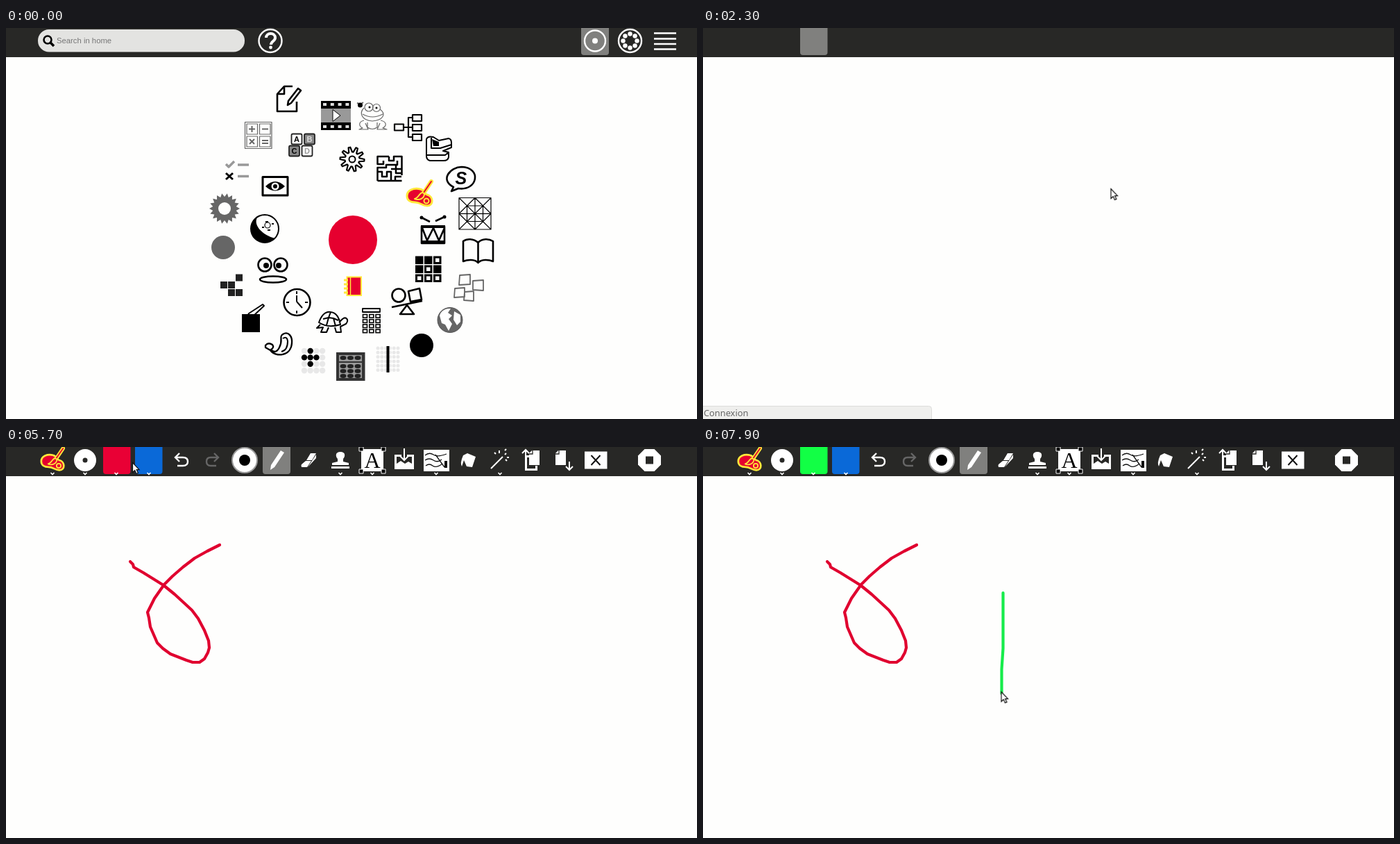
Recreate the animation shown at these times as an HTML page. Size 996 by 563 pixels, loop 8000 ms.

```html
<!DOCTYPE html>
<html lang="en">
<head>
<meta charset="utf-8">
<title>Paint session</title>
<style>
  html, body { margin: 0; width: 100%; height: 100%; overflow: hidden; background: #fefefd; }
  svg { display: block; width: 100%; height: 100%; }
  text { font-family: "Liberation Sans", Arial, sans-serif; stroke: none; }
  .line { fill: none; stroke: #000; stroke-width: 2.6; stroke-linejoin: round; }
  .thin { stroke-width: 1.2; }
  .gray { stroke: #666; }
  .solid { fill: #000; stroke: none; }
  .ink { fill: #fff; stroke: none; }
  .pen { fill: none; stroke: #fff; stroke-width: 2.4; }
  .stroke { fill: none; stroke-width: 4.2; stroke-linecap: round; stroke-linejoin: round; stroke-dasharray: 100 200; }

  .anim, .anim * { animation-duration: 8s; animation-delay: -10ms; animation-iteration-count: infinite; animation-timing-function: step-end; }
  #home { animation-name: home; }
  #hover { animation-name: hover; }
  #paint { animation-name: paint; }
  #tools { animation-name: tools; }
  #carets { animation-name: carets; }
  #blue { animation-name: blue; }
  #color { animation-name: color; }
  #status { animation-name: status; }
  #popup { animation-name: popup; }
  #bigArrow { animation-name: bigArrow; }
  #arrow { animation-name: arrow; }
  #loop { animation-name: loop; }
  #bar { animation-name: bar; }

  @keyframes home { 0% { opacity: 1 } 27.5%, 100% { opacity: 0 } }
  @keyframes hover { 0% { opacity: 0 } 18.75%, 100% { opacity: 1 } }
  @keyframes paint { 0% { opacity: 0 } 27.5%, 100% { opacity: 1 } }
  @keyframes tools { 0% { opacity: 0 } 30%, 100% { opacity: 1 } }
  @keyframes carets { 0% { opacity: 0 } 33.75%, 100% { opacity: 1 } }
  @keyframes blue { 0% { opacity: 0 } 31.25%, 100% { opacity: 1 } }
  @keyframes color {
    0% { fill: #282826 } 28.75% { fill: #80807e }
    31.25% { fill: #e90035 } 86.25%, 100% { fill: #12ff45 }
  }
  @keyframes status { 0% { opacity: 0 } 28.75% { opacity: 1 } 33.75%, 100% { opacity: 0 } }
  @keyframes popup { 0% { opacity: 0 } 76.25% { opacity: 1 } 86.25%, 100% { opacity: 0 } }
  @keyframes bigArrow {
    0% { transform: translate(-50px, -50px) }
    7.5% { transform: translate(164px, 177px) }
    8.75% { transform: translate(211px, 239px) }
    10% { transform: translate(211px, 239px); animation-timing-function: steps(4) }
    15% { transform: translate(410px, 322px); animation-timing-function: steps(3) }
    18.75% { transform: translate(575px, 245px) }
    20%, 100% { transform: translate(588px, 232px) }
  }
  @keyframes arrow {
    0% { transform: translate(587.5px, 231px) }
    33.75% { transform: translate(586px, 231px) }
    38.75% { transform: translate(586px, 231px); animation-timing-function: steps(3) }
    42.5% { transform: translate(298px, 234px) }
    45% { transform: translate(298px, 234px); animation-timing-function: steps(4) }
    50% { transform: translate(307px, 139px) }
    52.5% { transform: translate(283px, 154px) }
    53.75% { transform: translate(243px, 183px) }
    55% { transform: translate(214px, 218px) }
    56.25% { transform: translate(211px, 265px) }
    57.5% { transform: translate(243px, 300px) }
    58.75% { transform: translate(285.5px, 304px) }
    60% { transform: translate(280px, 253px) }
    61.25% { transform: translate(243px, 212px) }
    62.5% { transform: translate(179px, 163px) }
    66.25% { transform: translate(179px, 163px); animation-timing-function: steps(2) }
    68.75% { transform: translate(202px, 80px) }
    70% { transform: translate(192px, 11px) }
    71.25% { transform: translate(182px, 22px) }
    73.75% { transform: translate(172px, 11px) }
    78.75% { transform: translate(172px, 11px); animation-timing-function: steps(5) }
    85% { transform: translate(209px, 71px) }
    88.75% { transform: translate(209px, 71px); animation-timing-function: steps(4) }
    93.75% { transform: translate(432px, 210px); animation-timing-function: steps(4) }
    98.75%, 100% { transform: translate(429.5px, 352px) }
  }
  @keyframes loop {
    0% { stroke-dashoffset: 101 }
    51.25% { stroke-dashoffset: 101; animation-timing-function: steps(6) }
    58.75% { stroke-dashoffset: 35.7; animation-timing-function: steps(3) }
    62.5%, 100% { stroke-dashoffset: 0 }
  }
  @keyframes bar {
    0% { stroke-dashoffset: 101 }
    93.75% { stroke-dashoffset: 101; animation-timing-function: steps(4) }
    98.75%, 100% { stroke-dashoffset: 0 }
  }
</style>
</head>
<body>
<svg class="anim" viewBox="0 0 996 563">
  <defs>
    <g id="palette" stroke-linejoin="round" stroke-linecap="round">
      <path d="M-18 2C-18-7-8-10 1-8C7-7 6-1 11 0C20 2 21 16 11 16C4 16 1 11-6 11C-13 11-18 8-18 2Z" fill="#e6002f" stroke="#ffe83a" stroke-width="3"/>
      <path d="M17-19L5-1" stroke="#ffe83a" stroke-width="6"/>
      <path d="M17-19L6-3" stroke="#e6002f" stroke-width="2"/>
      <path d="M5-3C0-4-1 5-7 6C0 9 7 5 7-1Z" fill="#e6002f" stroke="#ffe83a" stroke-width="2"/>
      <circle cx="10" cy="9" r="3.5" fill="#e6002f" stroke="#ffe83a" stroke-width="2"/>
    </g>
  </defs>
  <rect width="996" height="563" fill="#fefefd"/>
  <rect width="996" height="42" fill="#282826"/>

  <g id="home">
    <rect x="46" y="2" width="298" height="32.5" rx="16" fill="#e3e3e1"/>
    <g class="line"><circle cx="60" cy="17" r="5.5"/><path d="M64 21l5 5" stroke-width="3.5"/></g>
    <text x="73" y="22" font-size="11.3" fill="#777">Search in home</text>
    <g class="pen">
      <circle cx="381" cy="18.5" r="16.5"/>
      <path d="M375 14c0-8 13-8 13 0c0 5-6 5-6 10" stroke-width="4"/>
      <rect x="829" y="-4" width="40" height="43" rx="4" fill="#80807e" stroke="none"/>
      <circle cx="849" cy="18.5" r="15"/>
      <circle cx="899.5" cy="18.5" r="16.5"/>
      <path d="M934 7.5h32m-32 8h32m-32 7.5h32m-32 7.5h32"/>
    </g>
    <g class="ink" id="ringDots"><circle cx="381.5" cy="28" r="2.4"/><circle cx="849" cy="18.5" r="4"/></g>

    <g class="line">
      <path d="M413 84H401L391 95V120H419V106M391 95H401V84"/>
      <path d="M421 87l4 3-14 18-5 3 1-6z"/>
      <g class="gray thin">
        <path d="M344.500 135.500h38.500v38h-38.500zM347 138h15.500v15h-15.500zM365.500 138h15.500v15h-15.500zM347 156h15.500v15h-15.500zM365.500 156h15.500v15h-15.500z"/>
        <path d="M350 145.500h9m-4.500-4.500v9M369 145.500h9M351 160l7 7m0-7l-7 7M369 162h9m-9 4h9" stroke-width="2"/>
      </g>
      <g class="thin gray">
        <circle cx="523" cy="114" r="6"/><circle cx="534" cy="115" r="5.500"/>
        <path d="M516 115C509 122 512 133 528 134C543 133 549 124 539 117M514 124Q528 132 543 124M516 133C508 135 508 141 514 144L509 146H522L518 137M540 133C549 135 549 141 543 144L549 146H535L539 137M521 136V143Q528 148 535 143V136"/>
        <path d="M506 108l3 1m6-2l-3 2" stroke-width="2"/>
        <g class="solid"><circle cx="524" cy="114" r="1.500"/><circle cx="534" cy="115" r="1.500"/><circle cx="510.500" cy="111" r="3.500"/></g>
      </g>
      <path d="M560 138.500h13v9h-13zM586 125h13v9h-13zM586 139h13v9h-13zM586 153h13v9h-13zM573 143h13M586 129h-6v28h6" stroke-width="2.200"/>
      <path d="M606 184V160Q608 155 616 157L624 162L638 159Q642 160 642 165V172L630 177L638 179V186Q637 191 631 191H611Q606 190 606 184ZM606 183H633L638 179M613 158V173H626L642 168" stroke-width="2"/>
      <path d="M614 160l10 4v6h-8z" class="solid"/>
      <path id="gear" stroke-width="2.200"/><circle cx="499" cy="189" r="4.500" stroke-width="2"/>
      <path d="M552 185H535.500V196H544V191M552 185V191H559V185H570.500V212M535.500 220V201H548V197H564V191M535.500 207H542V214H549V207H555V220H535.500M549 220H570.500M555 203H570M562 197V209H570M561 220V214H570" stroke-width="2.500"/>
      <path d="M645 229C625 219 640 200 657 200C686 201 680 235 652 231L642 235Z"/>
      <path d="M653 244.500h46v45.500h-46zM653 244.500l46 45.500m0-45.500l-46 45.500M676 244.500v45.500m-23-22.700h46M676 244.500l23 22.800l-23 22.700l-23-22.700zM664.500 256h23v22.500h-23z" class="thin"/>
      <path d="M599 273l12 6m21-7l-13 6M599 286h33v24h-33zM600 288l7 18l9-18l8 18l8-18"/><path d="M598 308h35M598 286h35" stroke-width="4"/>
      <g class="solid"><circle cx="599" cy="273" r="2.500"/><circle cx="632" cy="272" r="2.500"/></g>
      <path d="M680.500 309C674 303 664 303 659 307V336C666 333 676 333 680.500 338C685 333 695 333 702 336V307C696 303 686 303 680.500 309ZV337"/>
      <path d="M654 356l15-1v14l-16 1zM673 364l15-1v15l-15-1zM647 375l14-1v13l-15 1zM661 380l13-1v14l-14-1z" class="gray" stroke-width="1.800"/>
      <circle cx="640" cy="420.500" r="18" fill="#666" stroke="#555" stroke-width="1"/>
      <path d="M625 414C628 405 635 404 641 404L637 410L643 414L638 419L643 426L638 436L633 427L628 425ZM646 408L655 413L655 423L650 428L645 420Z" class="ink"/>
      <circle cx="566" cy="385" r="9.500"/><path d="M580 379l16-4l3 16l-16 3zM556 402l44-9M578 399l10 13h-20z"/>
      <path d="M514 404h25v5h-25z" stroke-width="1.800"/>
      <path d="M451 424C455 413 461 408 468 409C477 410 481 419 482 427C472 430 460 430 451 424ZM453 427L448 432L457 431L454 438H462L465 431M474 431L476 438H483L482 430L490 426C495 420 490 415 485 419L480 424M457 419L465 417L472 418L479 421M465 417L462 428M472 418L475 429M465 417L468 409" stroke-width="2"/>
      <circle cx="419.500" cy="395" r="19"/><path d="M419 394v-9m0 9l8 9M419 379v4m0 24v4M404 395h4m23 0h4" stroke-width="2"/>
      <path d="M346 418l4-7l20-13l2 2l-17 16z" stroke-width="2"/>
      <path d="M374 457Q378 452 384 456Q387 460 382 463Q389 470 394 460C400 448 393 445 399 441C407 436 413 444 412 454C411 472 389 475 381 464L374 460Z" stroke-width="2.300"/>
      <path d="M399 447Q405 443 406 451Q406 464 397 466" stroke-width="2"/>
      <circle cx="373" cy="341" r="9.500"/><circle cx="396" cy="341" r="9.500"/><ellipse cx="385" cy="362" rx="19" ry="4.500"/>
      <g class="solid"><circle cx="375" cy="342" r="4"/><circle cx="393" cy="342" r="4"/></g>
      <circle cx="373" cy="289" r="20" stroke-width="2"/>
      <path d="M364 270C353 283 371 299 388 303C378 314 353 310 353 289C353 280 358 273 364 270Z" class="solid"/>
      <path d="M374 279h4m-9 8h3m5 4h4m2-9h3" stroke-width="2"/><circle cx="377" cy="284" r="4" class="thin"/>
      <path d="M370 214.500h36v26.500h-36z" stroke-width="3"/><path d="M374 228Q388 214 402 228Q388 241 374 228Z" class="solid"/>
      <circle cx="388" cy="228" r="5.500" class="ink"/><circle cx="388" cy="228" r="3" class="solid"/>
      <path d="M317 196l4 4l8-8M334 197h16m-16 16.500h16" stroke="#999" stroke-width="3.500"/><path d="M317 209l10 9m0-9l-10 9" stroke-width="3"/>
    </g>
    <text x="647.500" y="225" font-size="25" font-weight="700" font-style="italic">S</text>

    <path d="M454 105h43v42h-43z"/><path d="M454 116h43v20h-43z" fill="#999"/>
    <path d="M457 110h38m-38 32h38" stroke="#ddd" stroke-width="4" stroke-dasharray="5 5.800"/>
    <path d="M471 117.500v17l11-8.500z" fill="#fff" stroke="#000"/>
    <g id="blocks" font-weight="700" font-size="11" text-anchor="middle"></g>
    <path id="burst" fill="#666"/><circle cx="315" cy="260" r="9" fill="#fefefd"/>
    <circle cx="313" cy="316" r="17" fill="#666"/>
    <path d="M331 354.500h10v10h-10zM309 365h10v10h-10zM320 365h10v10h-10zM320 376h10v10h-10zM331 376h10v10h-10z" fill="#222"/>
    <rect x="340" y="412" width="26" height="26"/>
    <circle cx="599" cy="457" r="17"/>
    <circle cx="500" cy="305" r="35" fill="#e6002f"/>
    <path d="M491.500 358.500h20.500v26.500h-20.500z" fill="#e6002f" stroke="#ffe83a" stroke-width="2"/>
    <path d="M496.500 359v25" stroke="#ffe83a" stroke-width="1.500"/><path d="M487 363h6m-6 6h6m-6 6h6m-6 6h6" stroke="#ffe83a" stroke-width="3"/>
    <g id="cells"></g>
    <path d="M476 467h41.500v41h-41.500z" fill="#333"/><path d="M480 471h33v33h-33z" fill="#999"/>
    <path d="M480 481h33" stroke="#333" stroke-width="2"/><g id="beads" fill="#222"></g>
    <g id="dots"></g>
    <path d="M550.500 458v38" stroke="#000" stroke-width="4"/>

    <rect id="hover" x="570" y="214" width="50" height="49" rx="4" fill="#d3d3d1"/>
    <use href="#palette" x="596" y="240"/>
    <path id="bigArrow" d="M0 0H17L12.500 5L21 14L15.500 20L6 11.500L0 17Z"/>
  </g>

  <g id="paint">
    <rect id="color" x="140" y="-4" width="39.500" height="43" rx="4"/>
    <g id="tools">
      <use href="#palette" transform="translate(67 19) scale(.9)"/>
      <g class="ink">
        <circle cx="114" cy="19" r="16"/><circle cx="114" cy="19" r="3.500" fill="#282826"/>
        <circle cx="344" cy="19" r="18" stroke="#999" stroke-width="2"/><circle cx="344" cy="19" r="8" fill="#000"/>
        <rect x="370" y="-4" width="40" height="43" rx="4" fill="#80807e"/>
        <path d="M396 5l5 3l-14 21l-6 4l1-7z"/>
        <path d="M439 9h8l-6 10h-8zM432 20h8l-6 9h-8q-1-3 0-4zM441 20l6-9v5l-12 13z"/>
        <path d="M482 7c8 0 7 7 4 10v4l8 2v3h-24v-3l8-2v-4c-3-3-4-10 4-10zM469 28h26v3h-26z"/>
        <rect x="512" y="3" width="32" height="32"/>
        <path d="M509 0h6v6h-6zM541 0h6v6h-6zM509 32h6v6h-6zM541 32h6v6h-6z" fill="#000" stroke="#fff"/>
        <path d="M560 11h10v3h-7v10l6-4l6 4l5-3l5 3v-10h-7v-3h10v21h-28z"/>
        <rect x="602" y="4" width="37" height="31"/>
        <path d="M659 12l6-3l12 5l-5 15l-8-1l-4-9l-3 9q-3-5 2-16z"/>
        <path d="M754 12h-6v22h18v-7h-3v4h-12v-16h3zM758 5h11v21h-15v-17zM796 5h11v21h-15v-17z"/>
        <rect x="834" y="6.500" width="32.500" height="25"/>
        <path d="M920.500 3h14l9.500 9.500v13l-9.500 9.500h-14l-9.500-9.500v-13z"/><path d="M922 13.500h11v11h-11z" fill="#282826"/>
      </g>
      <text x="528" y="30" font-size="32" text-anchor="middle" style="font-family:'Liberation Serif',serif">A</text>
      <g class="pen">
        <path id="undo" d="M250 9l-6 6l6 6M245 15h10q7 0 7 6t-7 6h-8"/>
        <path d="M300 9l6 6l-6 6M305 15h-10q-6 0-6 6t6 6h8" stroke="#666"/>
        <path d="M574 2v17m-6-6l6 6l6-6M699 31l17-17M719 11l2-2M711 5v4m11 6h3m-19-5l-2-2m15-3l2-2m-1 15l2 2M749 15v-11m-5 5l5-5l5 5M812 21v12m-5-5l5 5l5-5" stroke-width="2"/>
        <g stroke="#111" stroke-width="1.300">
          <path d="M604 12q6-5 12-1t19-1M604 19q6-4 12 0t12-1M619 11l13 18M605 27q5-4 10 0t14-3"/><path d="M634 20v10" stroke-width="4"/>
          <path d="M843.500 12l13 14m0-14l-13 14" stroke-width="2"/>
          <path d="M754 10h5v-5M792 10h5v-5" stroke="#282826"/>
        </g>
      </g>
    </g>
    <rect id="blue" x="186" y="-4" width="39.500" height="43" rx="4" fill="#0a69d8"/>
    <g id="carets" class="pen" style="stroke-width:1.600"></g>

    <path id="loop" class="stroke" stroke="#e0002f" pathLength="100" d="M308 141L290 150L272 160L255 173L240 186L228 198L214 218L204 238L206 246L208 259L218 282L226 290L237 298L260 307L269 310L279 310L286 305L291 296L293 289L292 279L286 264L277 247L268 235L255 223L243 212L227 199L198 181L184 173L183 169L179 165"/>
    <path id="bar" class="stroke" stroke="#16ec4b" pathLength="100" d="M432.500 210V290L430.500 320V355"/>

    <g id="popup">
      <rect x="137" y="42.500" width="322.500" height="192" stroke="#80807e" stroke-width="1.500"/>
      <path d="M137 43V0h45v43z" fill="#80807e"/><path d="M138 43V0h43v43z" fill="#e90035"/>
      <path d="M157 40l2.500-2.500l2.500 2.500" class="pen" style="stroke-width:1.600"/>
      <rect x="449" y="43" width="10" height="191" fill="#ddd"/><rect x="450" y="44" width="8" height="189" rx="4" fill="#fff"/>
    </g>
    <g id="status">
      <rect x="-4" y="544.500" width="333.500" height="24" rx="4" fill="#efefed" stroke="#dcdcda"/>
      <text x="1" y="559" font-size="12.800" fill="#666" style="font-family:'Noto Sans',sans-serif">Connexion</text>
    </g>
    <path id="arrow" d="M.5.500V14.500L3.700 11.500L6 16.500L8.400 15.400L6.200 10.600H10Z" fill="#fff" stroke="#111" stroke-width="1.200"/>
  </g>
</svg>
<script>
  const add = (id, markup) => document.getElementById(id).insertAdjacentHTML('beforeend', markup);
  const times = (n, fn) => Array.from({ length: n }, (_, i) => fn(i)).join('');
  const grid = (cols, rows, fn) => times(rows, r => times(cols, c => fn(c, r)));
  const dot = (x, y, r, fill) => `<circle cx="${x}" cy="${y}" r="${r}" ${fill ? `fill="${fill}"` : ''}/>`;
  const box = (x, y, w, h, rest = '') => `<rect x="${x}" y="${y}" width="${w}" height="${h}" ${rest}/>`;

  // Closed outline cycling through the given radii, one entry per corner.
  const cog = (id, cx, cy, teeth, radii) => {
    const count = teeth * radii.length;
    const d = times(count, i => {
      const a = i / count * 2 * Math.PI, r = radii[i % radii.length];
      return `${i ? 'L' : 'M'}${cx + r * Math.cos(a)} ${cy + r * Math.sin(a)}`;
    });
    document.getElementById(id).setAttribute('d', d + 'Z');
  };
  cog('gear', 499, 189, 10, [17.5, 17.5, 10.5, 10.5]);
  cog('burst', 315, 260, 18, [22, 17]);

  add('ringDots', times(8, i => dot(899.5 + 10 * Math.cos(i * Math.PI / 4), 18.5 + 10 * Math.sin(i * Math.PI / 4), 3.2)));

  const faces = [['#fff', '#000'], ['#888', '#ddd'], ['#888', '#000'], ['#fff', '#999']];
  add('blocks', times(4, i => {
    const x = 411.5 + (i % 2) * 18.5 - (i > 1 ? 3.5 : 0), y = i > 1 ? 169.5 : 152.5;
    return box(x, y, 15, 15, `rx="2" fill="${faces[i][0]}" stroke="#222" stroke-width="1.8"`) +
      `<text x="${x + 7.5}" y="${y + 11.5}" fill="${faces[i][1]}">${'ABCD'[i]}</text>`;
  }));

  add('cells', grid(3, 3, (c, r) => {
    const open = r === 2 || c + r === 2;
    return box(590 + c * 13, 328.5 + r * 13, 11.5, 11.5) +
      (open ? box(593 + c * 13, 331.5 + r * 13, 5.5, 5.5, 'fill="#fff"') : '');
  }));
  add('cells', grid(3, 4, (c, r) =>
    box(514.5 + c * 9.3, 412.5 + r * 7.2, 6, 4.6, 'fill="none" stroke="#000" stroke-width="1.6"')));
  add('beads', grid(3, 4, (c, r) => `<ellipse cx="${486 + c * 10.5}" cy="${[475, 487, 494, 501][r]}" rx="4.5" ry="3"/>`));

  const inPlus = (c, r) => Math.abs(c - 1) + Math.abs(r - 1) < 2;
  add('dots', grid(4, 4, (c, r) => dot(430 + c * 8.7, 465 + r * 9.4, 4.2, inPlus(c, r) ? '#000' : '#e8e8e8')));
  add('dots', grid(6, 6, (c, r) => dot(536 + c * 5.8, 461 + r * 6.3, 2.5, '#e8e8e8')));

  add('carets', [67, 114, 159, 206, 482, 528, 620, 712].map(x => `<path d="M${x - 2.5} 37l2.500 2.500l2.500-2.500"/>`).join(''));

  const swatches = ['#e90035', '#12ff45', '#0a69d8', '#f48325', '#08931f', '#10adf2',
    '#ffff45', '#a012f0', '#55007f', '#000', '#8f9593', '#fff'];
  add('popup', grid(3, 4, (c, r) =>
    `<circle cx="${164 + c * 45.5}" cy="${70 + r * 46.3}" r="18" fill="${swatches[r * 3 + c]}" stroke="#fff" stroke-width="1.6"/>`));
  const sliders = [['Red', 399], ['Green', 324], ['Blue', 327]];
  add('popup', sliders.map(([name, x], i) => {
    const y = 71.5 + i * 38.6;
    return `<text x="298" y="${y - 9}" font-size="11.5" fill="#fff">${name}</text>` +
      box(299.5, y - 4.5, 108.5, 9, 'rx="4" fill="#80807e"') +
      `<circle cx="${x}" cy="${y}" r="7.5" fill="#bdbdbb" stroke="#80807e" stroke-width="2.5"/>`;
  }).join(''));
</script>
</body>
</html>
```
